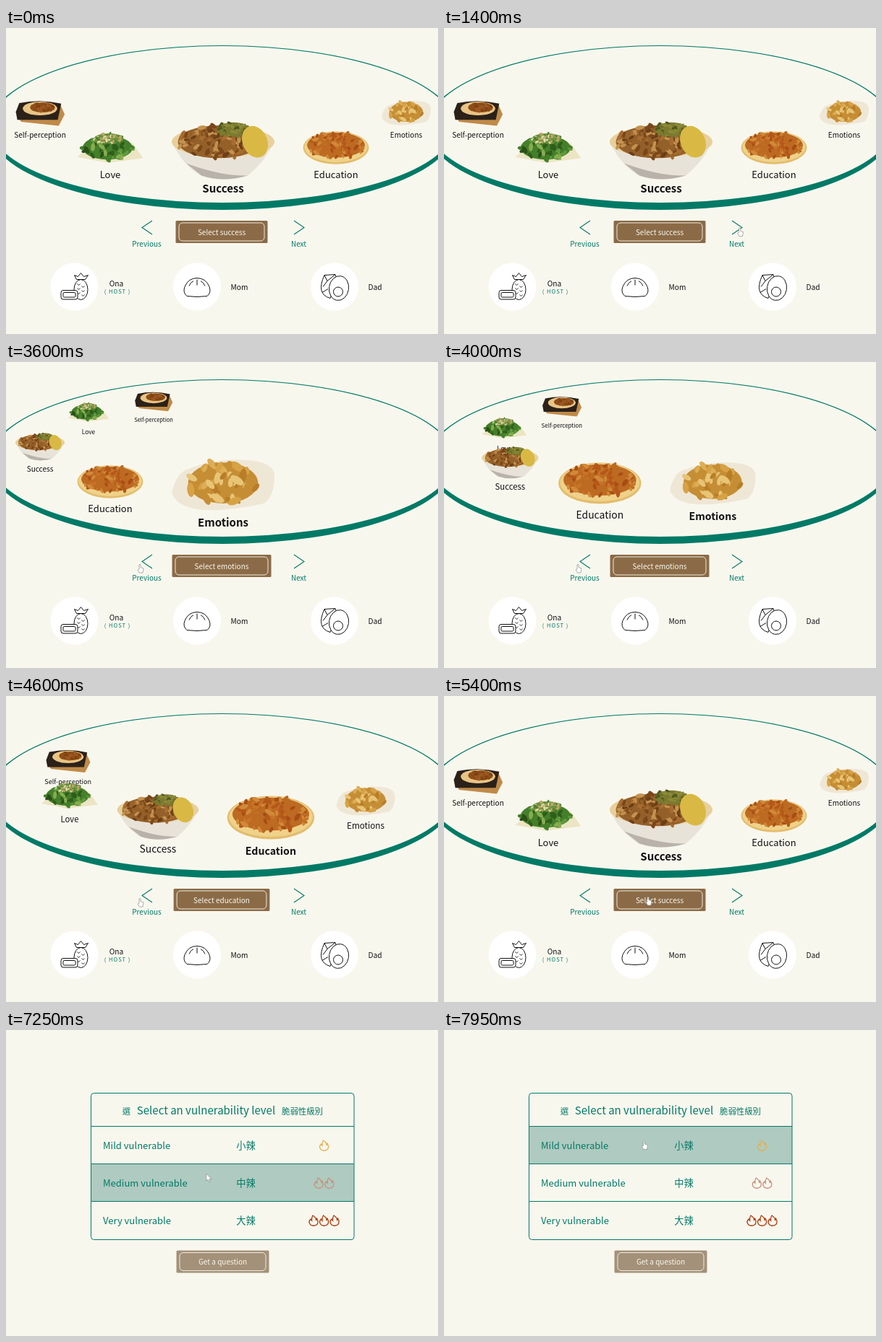
Write an HTML page with a canvas that moves like this. It is 597x424 px and loops after 8 s.

```html
<!DOCTYPE html>
<html lang="en">
<head>
<meta charset="utf-8">
<title>Topic carousel</title>
<style>
html, body { margin: 0; width: 100%; height: 100%; overflow: hidden; background: #f8f7ee; }
canvas { display: block; }
</style>
</head>
<body>
<canvas id="stage" width="597" height="424"></canvas>
<script>
const ctx = document.getElementById('stage').getContext('2d');
const LOOP = 8000, TEAL = '#007a66', PAPER = '#f8f7ee', INK = '#111';
const FONT = '"Noto Sans CJK TC", "Noto Sans CJK JP", "Noto Sans CJK SC", "Noto Sans CJK", "Noto Sans", sans-serif';

const clamp = v => Math.max(0, Math.min(1, v));
const mix = (a, b, k) => a + (b - a) * k;
const smooth = k => k * k * (3 - 2 * k);
const easeOut = k => 1 - (1 - clamp(k)) ** 1.7;
const progress = (t, begin, length) => clamp((t - begin) / length);

// ---------- drawing helpers ----------
function text(str, x, y, size, { color = INK, weight = 400, align = 'center', spacing = 0 } = {}) {
  ctx.font = `${weight} ${size}px ${FONT}`;
  ctx.letterSpacing = spacing + 'px';
  ctx.textAlign = align;
  ctx.fillStyle = color;
  ctx.fillText(str, x, y + size * 0.36);
}
function paint(path, fill, stroke, width = 1) {
  if (fill) { ctx.fillStyle = fill; ctx.fill(path); }
  if (stroke) { ctx.strokeStyle = stroke; ctx.lineWidth = width; ctx.stroke(path); }
}
const shape = (d, ...style) => paint(new Path2D(d), ...style);
function oval(x, y, rx, ry, turn, ...style) {
  const p = new Path2D();
  p.ellipse(x, y, rx, ry, turn, 0, 7);
  paint(p, ...style);
}
function box(x, y, w, h, r, ...style) {
  const p = new Path2D();
  p.roundRect(x, y, w, h, r);
  paint(p, ...style);
}
function at(x, y, scale, draw) {
  ctx.save();
  ctx.translate(x, y);
  ctx.scale(scale, scale);
  draw();
  ctx.restore();
}
// Heap of small seeded pieces filling an oval
function heap(x, y, rx, ry, size, ...colors) {
  let seed = rx * 97 + ry;
  const rnd = () => (seed = (seed * 16807) % 2147483647) / 2147483647;
  oval(x, y, rx, ry, 0, colors[0]);
  for (let n = 3 * rx * ry / size ** 2; n > 0; n--) {
    const a = rnd() * 2 * Math.PI, d = Math.sqrt(rnd()), s = size * (0.5 + rnd() * 0.6);
    oval(x + Math.cos(a) * d * rx, y + Math.sin(a) * d * ry, s, s / 2, rnd() * 3,
      colors[Math.floor(rnd() * colors.length)]);
  }
}

// ---------- dishes, each 100 units wide ----------
function steak() {
  shape('M-48 6L-38 19L38 27L50 4L42-14Z', '#c08a48');
  shape('M-49-1L-42-19Q0-28 43-18L36 15L-46 15Z', '#2b2119');
  oval(0, -8, 35, 14, 0, '#e8c485');
  heap(5, -10, 25, 10, 4, '#8d4d18', '#9c5a24', '#7c3e10');
}
function greens() {
  shape('M-50 15L-28-4L34-6L50 17L-4 24Z', '#ebe5c3');
  heap(-4, 1, 38, 18, 6, '#447f2a', '#2f5d1b', '#5f9a3c', '#86ac4f', '#2a5018');
  heap(-2, -13, 22, 8, 3, '#6d9340', '#e6dcae', '#447f2a', '#c3a767');
}
function rice() {
  shape('M-50-9Q-42 12-22 25Q0 32 24 25Q42 10 50-9Z', '#e8e3d8');
  shape('M-36 13L-21 25Q0 32 24 25Q0 26-36 13Z', '#b9b2aa');
  oval(0, -8, 50, 15, 0, '#e8d09c');
  heap(-4, -8, 40, 16, 4, '#94602a', '#a86c30', '#7a4719', '#c4924f', '#6b3f17');
  heap(10, -20, 16, 7, 3, '#7c7a30', '#8d8a36', '#4f5a1d');
  oval(31, -8, 12, 16, -0.4, '#d9b943');
}
function omelette() {
  oval(0, 1, 50, 25, 0, '#e3bd6c');
  oval(0, 0, 48, 23, 0, '#efd28a');
  heap(0, -3, 44, 19, 5, '#bd6a22', '#b4581a', '#c87428', '#a84c14', '#d08a38');
}
function tofu() {
  shape('M-50 9Q-46-9-36-14Q0-28 34-22Q50-18 50-8Q50 12 40 19Q-40 36-50 9Z', '#efe7d6');
  heap(0, -1, 34, 20, 7, '#c58e35', '#d6a244', '#b97d27', '#e8c476', '#dcae55');
}

// Ring places by distance from the front: [side offset, y, dish scale, label size]
const places = [[0, 169, 1, 15], [156, 165, 0.64, 13], [253, 117, 0.48, 10], [186, 69, 0.4, 8.4], [96, 54, 0.37, 7.5]];
const dishes = [['Self-perception', steak], ['Love', greens], ['Success', rice], ['Education', omelette], ['Emotions', tofu]];

function drawDish([name, draw], pos) {
  const far = Math.abs(pos), i = Math.min(Math.floor(far), places.length - 2);
  const [dx, y, scale, size] = places[i].map((v, k) => mix(v, places[i + 1][k], far - i));
  const x = 300 + Math.sign(pos) * dx;
  at(x, y, scale * 1.42, draw);
  text(name, x, y + 10 + 44 * scale, size, { weight: far < 0.5 ? 700 : 400 });
}
function button(label, x, y, w, fill) {
  box(x - w / 2, y - 15.5, w, 31, 1.5, fill);
  box(x - w / 2 + 4.5, y - 12.5, w - 9, 25, 5, null, PAPER, 0.9);
  text(label, x, y + 0.5, 10, { color: PAPER, weight: 500 });
}

// ---------- players, drawn around the badge centre ----------
function pineapple() {
  oval(9, 4, 9.5, 14, 0, '#fff', INK);
  shape('M3-10L0-16L5-14L9-19L13-14L19-16L15-10Z', '#fff', INK);
  for (let i = 0; i < 6; i++) shape(`M${4 + i % 2 * 6} ${-4 + i * 3}l2 2l2-2`, null, INK, 0.9);
  box(-18.5, 5, 23, 12.5, 3, '#fff', INK);
  box(-15.5, 8, 17, 6.5, 1.5, null, INK);
}
function bun() {
  shape('M-14 13Q-20 8-17 0Q-12-12 0-12Q12-12 17 0Q20 8 14 13Q0 15-14 13Z', '#fff', INK);
  shape('M-11-1Q-9-6-5-8M0-10V-2M5-8Q9-6 11-1', null, INK);
}
function eggs() {
  shape('M-14-16L1-17L4-8L-6 16Q-26 10-14-16Z', '#fff', INK);
  shape('M-14-16L-10-8L1-17M-10-8L-16 0M-17 8L-9 3', null, INK);
  oval(6, 2, 13.5, 17, 0.15, '#fff', INK);
  oval(5, 7, 6.5, 6.5, 0, null, INK);
}

// ---------- screens ----------
function ring() {
  const p = new Path2D();
  p.ellipse(299, 138, 323, 114, 0, 0, 7);
  p.closePath();
  p.moveTo(618, 138);
  p.ellipse(299, 138, 319, 104, 0, 0, Math.PI);
  p.ellipse(299, 138, 321, 112.9, 0, Math.PI, 2 * Math.PI);
  ctx.fillStyle = TEAL;
  ctx.fill(p, 'evenodd');
}
function carousel(turn) {
  ring();
  dishes.forEach((dish, i) => drawDish(dish, i - 2 - turn));
  shape('M202 267L188 276.500L202 286M398 267L412 276.500L398 286', null, TEAL, 1.1);
  text('Previous', 194.5, 299, 10, { color: TEAL });
  text('Next', 404.5, 299, 10, { color: TEAL });
  const topic = dishes[2 + Math.round(turn)][0].toLowerCase();
  button('Select ' + topic, 298, 282.5, 127 + 10 * Math.min(1, turn), '#8b6b47');
  [[94.5, pineapple], [264, bun], [454, eggs]].forEach(([x, icon]) => {
    oval(x, 358.5, 33, 33, 0, '#fff');
    at(x, 358.5, 1, icon);
  });
  text('Ona', 152.5, 354, 10.2);
  text('( HOST )', 154, 365.5, 7.6, { color: TEAL, spacing: 1 });
  text('Mom', 322.5, 359.5, 10.2);
  text('Dad', 510, 359.5, 10.2);
}

const ROW = 52, TOP = 133.5;
const levels = [['Mild', '小辣', '#e2b04e'], ['Medium', '中辣', '#c79078'], ['Very', '大辣', '#ad3a0c']];

function flame(color) {
  shape('M-1-7Q4-4 3.500 0L4.500-3Q8 3 4 6Q0 8.500-4 6Q-8 2-4-2L-2.500 0Q-3-4-1-7Z', null, color, 1.3);
}
function levelMenu(pointerY) {
  const hover = Math.floor((pointerY - TOP) / ROW);
  ctx.fillStyle = PAPER;
  ctx.fillRect(0, 0, 597, 424);
  if (levels[hover]) box(117.5, TOP + hover * ROW, 363.5, ROW, 0, '#afcac0');
  box(117.5, 87.5, 363.5, 203, 4, null, TEAL);
  text('選', 166.5, 113, 11.4, { color: TEAL });
  text('Select an vulnerability level', 276.5, 111.5, 15, { color: TEAL });
  text('脆弱性級別', 409.5, 112.5, 11.4, { color: TEAL });
  levels.forEach(([name, zh, color], i) => {
    const y = TOP + i * ROW;
    shape(`M117.500 ${y}H481`, null, TEAL);
    text(name + ' vulnerable', 134, y + 27, 13, { color: TEAL, weight: 500, align: 'left' });
    text(zh, 331.5, y + 27, 13.2, { color: TEAL, weight: 500 });
    for (let k = 0; k <= i; k++) at(439.5 + (k - i / 2) * 14.5, y + 26.5, 1, () => flame(color));
  });
  button('Get a question', 299.5, 321, 128, '#a49179');
}

// ---------- pointer ----------
// It glides to each stop and is a hand from arrival until `hand`
const stops = [
  { leave: 600, arrive: 900, x: 409.5, y: 282.5, hand: 2400 },
  { leave: 2950, arrive: 3550, x: 186, y: 286, hand: 4960 },
  { leave: 4960, arrive: 5280, x: 283, y: 284, hand: 5700 },
  { leave: 5700, arrive: 6350, x: 283, y: 267, hand: 0 },
  { leave: 6700, arrive: 7700, x: 277.5, y: 159.5, hand: LOOP }
];
function pointerAt(t) {
  const p = { x: 470, y: 340, visible: t > stops[0].leave, hand: false };
  for (const s of stops) {
    const k = smooth(progress(t, s.leave, s.arrive - s.leave));
    p.x = mix(p.x, s.x, k);
    p.y = mix(p.y, s.y, k);
    p.hand ||= t >= s.arrive && t < s.hand;
  }
  return p;
}
function drawPointer({ x, y, hand }) {
  const d = hand
    ? 'M-2 1V-5Q-1-6.500 0-5V-1.500L4 0L3 6H-1.500L-4 2Z'
    : 'M-3-6V4L-.800 2L1 6L2.500 5.300L.900 1.500H4Z';
  at(x, y, 1, () => shape(d, '#fff', '#8a8a8a', 0.7));
}

function render(t) {
  const step = begin => easeOut(progress(t, begin, 500));
  const turn = step(1900) + step(2395) - step(3850) - step(4463);
  const fade = easeOut(progress(t, 5600, 400));
  const pointer = pointerAt(t);
  ctx.fillStyle = PAPER;
  ctx.fillRect(0, 0, 597, 424);
  if (fade < 1) carousel(turn);
  if (fade > 0) {
    ctx.globalAlpha = fade;
    levelMenu(pointer.y);
    ctx.globalAlpha = 1;
  }
  if (pointer.visible) drawPointer(pointer);
}

const start = performance.now();
function tick() {
  render((performance.now() - start) % LOOP);
  requestAnimationFrame(tick);
}
tick();
</script>
</body>
</html>
```
